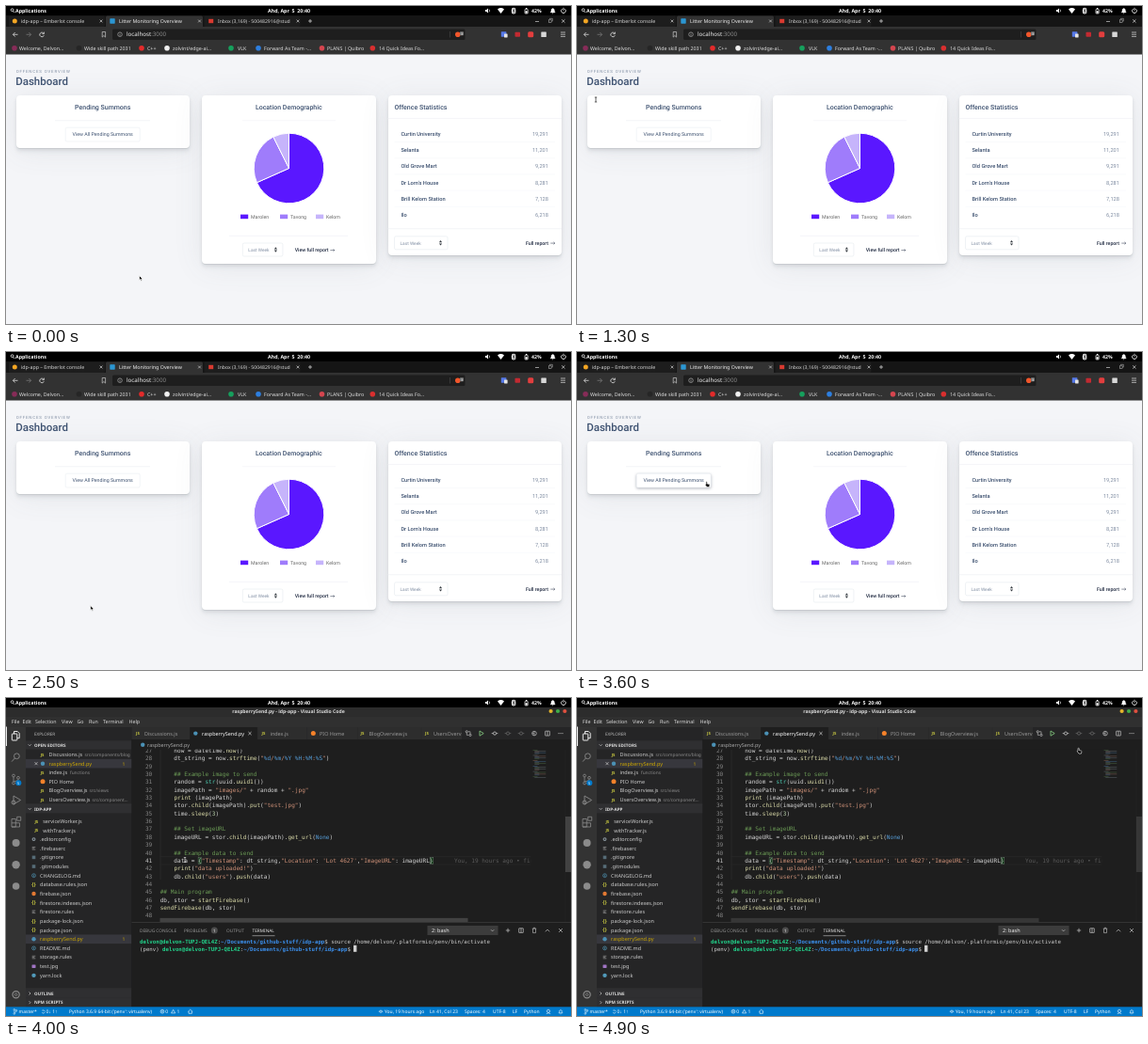
Write an HTML page that moves like this. It is 600 by 338 pixels and loops after 5000 ms.

```html
<!DOCTYPE html>
<html lang="en">
<head>
<meta charset="utf-8">
<title>Desktop demo</title>
<style>
html, body { margin: 0; width: 100%; height: 100%; overflow: hidden; background: #000; }
.scene, svg { position: absolute; left: 0; top: 0; width: 600px; height: 338px; overflow: hidden; }
text { white-space: pre; text-rendering: geometricPrecision; }
.card {
  position: absolute; top: 95px; width: 184.5px; border-radius: 4px; background: #fff;
  box-shadow: 0 .9px 0 rgba(90,97,105,.11), 0 1.8px 3.5px rgba(90,97,105,.12),
    0 4.4px 4.4px rgba(90,97,105,.06), 0 3px 31px rgba(90,97,105,.1);
}
.hover { filter: drop-shadow(0 1px 1.5px rgba(60,70,90,.4)); }
</style>
</head>
<body>
<div class="scene" id="web" style="background:#f4f5f8">
  <div class="card" style="left:10.5px;height:56px"></div>
  <div class="card" style="left:208px;height:178.5px"></div>
  <div class="card" style="left:405.5px;height:170px"></div>
</div>
<div class="scene" id="ide" style="background:#1e1e1e"></div>
<svg id="top" viewBox="0 0 600 338"></svg>
<script>
const NS = 'http://www.w3.org/2000/svg';
const UI = "'Noto Sans', 'Open Sans', sans-serif", WEB = 'Roboto, sans-serif';
const MONO = "'DejaVu Sans Mono', 'Noto Sans Mono', monospace";
let layer, font = UI;

function add(tag, attrs, parent = layer) {
  const e = document.createElementNS(NS, tag);
  for (const k in attrs) e.setAttribute(k, attrs[k]);
  parent.appendChild(e);
  return e;
}
const svgIn = id => add('svg', { viewBox: '0 0 600 338' }, document.getElementById(id));
function text(x, y, str, size, fill, more = {}) {
  const e = add('text', { x, y, fill, 'font-size': size, 'font-family': font, ...more });
  e.textContent = str;
  return e;
}
function mono(x, y, size, parts) {
  const e = add('text', { x, y, 'font-size': size, 'font-family': MONO });
  for (const [str, fill, weight = 400] of parts)
    add('tspan', { fill, 'font-weight': weight }, e).textContent = str;
}
const rect = (x, y, width, height, fill, rx = 0, more = {}) => add('rect', { x, y, width, height, fill, rx, ...more });
const dot = (cx, cy, r, fill) => add('circle', { cx, cy, r, fill });
const ring = (cx, cy, r, stroke, w = .7) => add('circle', { cx, cy, r, stroke, fill: 'none', 'stroke-width': w });
const line = (d, stroke, w = .7) => add('path', { d, stroke, fill: 'none', 'stroke-width': w });
const fill = (d, color) => add('path', { d, fill: color });
const cross = (x, y, r, c, w = .7) => line(`M${x - r} ${y - r}l${2 * r} ${2 * r}m0 ${-2 * r}l${-2 * r} ${2 * r}`, c, w);
const plus = (x, y, r, c) => line(`M${x - r} ${y}h${2 * r}M${x} ${y - r}v${2 * r}`, c);
const frame = (x, y, w, h, c, rx = 0, bg = 'none', sw = .5) => rect(x, y, w, h, bg, rx, { stroke: c, 'stroke-width': sw });

function panelBar() {
  font = UI;
  rect(0, 0, 600, 10, '#000');
  ring(6.6, 4.2, 1.4, '#fff', .8);
  line('M7.6 5.3l1.5 1.8', '#fff', .8);
  text(10, 7.2, 'Applications', 5.3, '#fff', { 'font-weight': 700 });
  text(300.5, 7.2, 'Ahd, Apr  5  20:40', 5.3, '#fff', { 'font-weight': 700, 'text-anchor': 'middle' });
  fill('M509 4h1.3l1.7-1.6v5.2l-1.7-1.6h-1.3z', '#fff');
  line('M513.2 3.6q1 1.4 0 2.8', '#fff', .6);
  fill('M522 3.4q3.5-2.8 7 0l-3.5 4.6z', '#fff');
  rect(536.9, 1.7, 4.4, 6.8, '#fff', 2.1);
  line('M537.8 3.6l2.6 2.8l-1.3 1.2v-5l1.3 1.2l-2.6 2.8', '#000', .5);
  frame(551, 3.4, 3.2, 4.6, '#fff', .5, 'none', .7);
  rect(551.6, 5.2, 2, 2.5, '#fff');
  rect(551.9, 2, 1.4, 1, '#fff');
  text(558, 7.2, '42%', 5.2, '#fff', { 'font-weight': 700 });
  fill('M577.8 7l1-1.3v-1.8q1.9-3.2 3.8 0v1.8l1 1.3zM579.8 7.5h1.8l-.9.9z', '#fff');
  line('M590.6 3.2a2.4 2.4 0 1 0 2.8 0M592 1.8v3', '#fff', .8);
}

function buildBrowser() {
  layer = svgIn('web');
  rect(0, 10, 600, 12.5, '#151515');
  rect(0, 22, 600, 29.5, '#323232');
  rect(3, 10.5, 102, 11.5, '#1d1d1d', 1.5);
  rect(106, 10.5, 103, 12.5, '#323232', 1.5);
  rect(210.5, 10.5, 102, 11.5, '#1d1d1d', 1.5);
  panelBar();

  dot(9.3, 16, 2.5, '#f5a623');
  rect(110.3, 13.3, 5.4, 5.4, '#2b97d3', .6);
  rect(215.2, 13.8, 5, 4.4, '#d93a30');
  text(16, 18, 'idp-app – Emberlot console', 5.25, '#d8d8d8');
  text(120, 18, 'Litter Monitoring Overview', 5.3, '#eee');
  text(225, 18, 'Inbox (3,169) - 500482916@stud', 5.1, '#d8d8d8');
  rect(304, 12, 3, 9, '#1d1d1d');
  for (const x of [101, 205.5, 310]) cross(x, 16, 1.4, '#ccc');
  plus(323, 16, 2, '#ddd');
  line('M562 16.5h4', '#ccc');
  frame(576.3, 14.8, 2.8, 2.8, '#ccc');
  line('M577.5 14v-.7h2.8v2.8h-.8', '#ccc', .5);
  cross(591.8, 16, 1.7, '#ddd');

  line('M12.5 30.3h-5m2.2-2.3l-2.3 2.3l2.3 2.3', '#ddd', .8);
  line('M21.5 30.3h5m-2.2-2.3l2.3 2.3l-2.3 2.3', '#777', .8);
  line('M39.8 28.9a2.3 2.3 0 1 0 .5 2.2M40.4 27.6v2h-2', '#ddd', .8);
  line('M102.2 27.5h3.4v5.6l-1.7-1.6l-1.7 1.6z', '#ccc', .7);
  rect(113, 24.5, 374.5, 11.5, '#1e1e1e', 1.5);
  ring(121, 30.2, 2.3, '#bbb', .6);
  line('M121 29.8v1.8m0-2.9v.5', '#bbb', .6);
  const url = text(128, 32.4, 'localhost', 6.2, '#f2f2f2');
  add('tspan', { fill: '#8d8d8d' }, url).textContent = ':3000';
  line('M471.5 27v6.5', '#555', .5);
  dot(479.8, 30.3, 2.8, '#f1562b');
  rect(482, 27.2, 4, 4, '#777', .8);
  text(483, 30.5, '3', 3.5, '#fff');
  rect(525.8, 27.2, 5.6, 5.6, '#5578e8', .6);
  rect(529, 29.5, 3.6, 4, '#e4e4e4', .4);
  rect(540.5, 27.8, 5.5, 5, '#c22a31', .8);
  rect(554.2, 27.2, 6, 6, '#e23e3e', 1.5);
  rect(568.3, 27.5, 5.5, 5.5, '#d8d8d8', .5);
  line('M589 28h5m-5 2.2h5m-5 2.2h5', '#ddd');

  const marks = [[9, '#872c58', 14, 'Welcome, Delvon...'], [77.5, '#262626', 83, 'Wide skill path 2031'],
    [144, '#e32b2b', 150, 'C++'], [171, '#f0f0f0', 177, 'zolvint/edge-ai...'],
    [239, '#16a05d', 246, 'VLK'], [268, '#2d7fe0', 274, 'Forward As Team -...'],
    [335.5, '#d5454f', 341, 'PLANS | Quibro'], [389.3, '#d92f2f', 396, '14 Quick Ideas Fo...']];
  for (const [x, c, tx, name] of marks) {
    dot(x, 44.8, 2.8, c);
    text(tx, 46.8, name, 5.3, '#e0e0e0');
  }

  font = WEB;
  const ink = '#3d5170', soft = '#818ea3', rule = '#eceff3';
  const bold = { 'font-weight': 500 }, mid = { ...bold, 'text-anchor': 'middle' };
  text(10.7, 71.1, 'OFFENCES OVERVIEW', 4.3, soft, { 'letter-spacing': .88 });
  text(10.2, 84, 'Dashboard', 11.5, ink, bold);

  text(102.7, 110.4, 'Pending Summons', 7, ink, mid);
  line('M52 121.7h101', rule, .6);
  const button = frame(63.2, 129.2, 79, 14.8, '#e4e8ee', 1.6, '#fff');
  text(102.7, 138.4, 'View All Pending Summons', 5.27, ink, { 'text-anchor': 'middle' });

  text(300.3, 110.4, 'Location Demographic', 7, ink, mid);
  line('M251 121.7h99', '#f1f3f6', .6);
  const at = a => `${300.5 + 37.3 * Math.sin(a * Math.PI / 180)} ${172.5 - 37.3 * Math.cos(a * Math.PI / 180)}`;
  const shades = ['#5a17ff', '#9f7cfb', '#c6b4fb'], cuts = [0, 246, 333.5, 360];
  const areas = [[249, 'Marolen'], [291, 'Tavong'], [329, 'Kelom']];
  shades.forEach((c, i) => {
    const wide = cuts[i + 1] - cuts[i] > 180 ? 1 : 0;
    add('path', { d: `M300.5 172.5L${at(cuts[i])}A37.3 37.3 0 ${wide} 1 ${at(cuts[i + 1])}z`,
      fill: c, stroke: '#fff', 'stroke-width': 1 });
    rect(areas[i][0], 221.6, 8.2, 4.6, c);
    text(areas[i][0] + 11, 225.9, areas[i][1], 5.27, '#666');
  });
  line('M237 244.3h126', rule, .6);

  const select = (x, y, w) => {
    frame(x, y, w, 14, '#dfe4ea', 1.6, '#fff');
    text(x + 6, y + 8.7, 'Last Week', 4.8, soft);
    const a = x + w - 7.5;
    fill(`M${a - 1.6} ${y + 6.4}l1.6-2.2l1.6 2.2zM${a - 1.6} ${y + 7.6}l1.6 2.2l1.6-2.2z`, '#343a40');
  };
  const report = (x, y, s, ax) => {
    text(x, y, s, 5.27, '#212b42', bold);
    line(`M${ax} ${y - 1.7}h4.6m-1.4-1.2l1.3 1.2l-1.3 1.2`, '#212b42', .5);
  };
  select(251.3, 252, 42.6);
  report(306.7, 261.3, 'View full report', 344.3);

  text(412.4, 110.2, 'Offence Statistics', 7, ink, bold);
  line('M405.5 119.6h184.5M405.5 236.7h184.5', rule, .6);
  const rows = [['Curtin University', '19,291'], ['Selanta', '11,201'], ['Old Grove Mart', '9,291'],
    ["Dr Lorn's House", '8,281'], ['Brill Kelom Station', '7,128'], ['Ilo', '6,218']];
  rows.forEach(([name, n], i) => {
    const y = 138 + i * 17.2;
    text(419.4, y, name, 5.7, ink, bold);
    text(576, y, n, 5.7, soft, { 'text-anchor': 'end' });
    if (i < 5) line(`M412.5 ${y + 6.5}h170.5`, '#f3f5f8', .5);
  });
  select(412.5, 244.8, 56.5);
  report(552, 253.8, 'Full report', 578.3);
  return button;
}

function fileIcon(kind, x, y) {
  if (kind === 'js') text(x - 2.3, y + 1.7, 'JS', 4.3, '#cbcb41', { 'font-weight': 700 });
  else if (kind === 'json') text(x - 2.2, y + 1.7, '{}', 5.4, '#cbcb41', { 'font-weight': 700 });
  else if (kind === 'py') dot(x, y, 2.2, '#4b91b5');
  else if (kind === 'pio') dot(x, y, 2.5, '#f5822a');
  else if (kind === 'fire') dot(x, y, 2.2, '#e37933');
  else if (kind === 'git') rect(x - 1.8, y - 1.8, 3.6, 3.6, '#566c77');
  else if (kind === 'md') { ring(x, y, 1.9, '#519aba'); line(`M${x} ${y - .9}v2`, '#519aba', .6); }
  else if (kind === 'gear') ring(x, y, 1.4, '#8d9aa3', 1.1);
  else if (kind === 'img') rect(x - 2, y - 1.7, 4, 3.4, '#a074c4', .4);
  else if (kind === 'lock') dot(x, y, 2.2, '#519aba');
  else line(`M${x - 1.8} ${y - 1.3}h3.6m-3.6 1.3h2.6m-2.6 1.3h3.6`, '#c5c5c5', .5);
}

function buildSidebar() {
  const grey = '#ccc', warn = '#cca700', head = { 'font-weight': 700 };
  rect(0, 31, 21, 298, '#333');
  rect(21, 31, 112.5, 298, '#252526');
  const dim = '#8b8b8b';
  rect(0, 30.5, .9, 20.5, '#fff');
  frame(6.3, 38, 5.5, 7, '#fff', .6, 'none', .9);
  line('M8.5 38v-2.5h3.7l2 2v5.2h-2.2', '#fff', .9);
  ring(11.4, 61.8, 2.9, dim, .9);
  line('M9.3 64l-3.2 3.6', dim, .9);
  for (const [x, y] of [[8, 82.5], [8, 90.5], [13, 84.8]]) ring(x, y, 1.4, dim, .8);
  line('M8 84v5M13 86.3q0 2.2-4.4 2.4', dim, .8);
  dot(13.3, 90.2, 3, '#007acc');
  text(12.1, 91.6, '5', 3.8, '#fff');
  line('M8 104l7.5 4.5l-7.5 4.5z', dim, .9);
  ring(8, 111, 2, dim, .9);
  line('M6 128.5h4.3v8.5h-4.3zM6 132.8h8.5v4.2h-8.5M11.7 126.3h4v4h-4z', dim, .8);
  dot(10.6, 154, 4, dim);
  dot(10.6, 177.3, 4.2, dim);
  dot(10.6, 200, 3.8, dim);
  ring(10.6, 315.2, 3.6, dim, 1.2);
  ring(10.6, 315.2, 1.3, dim, .8);

  text(30, 39.7, 'EXPLORER', 4.6, '#bbb');
  const section = (y, s, open) => {
    rect(21, y - 4.6, 112.5, 9.2, '#2f2f31');
    line(open ? `M23.7 ${y - .7}l1.5 1.5l1.5-1.5` : `M24.5 ${y - 1.5}l1.5 1.5l-1.5 1.5`, grey);
    text(30, y + 1.7, s, 4.6, '#ddd', head);
  };
  section(50, 'OPEN EDITORS', true);
  section(117.8, 'IDP-APP', true);
  line('M21 113h112.5M21 309h112.5M21 319h112.5', '#414143', .5);
  section(314, 'OUTLINE', false);
  section(323.7, 'NPM SCRIPTS', false);

  const row = (y, kind, x, s, hint = '', hx = 0) => {
    const on = kind === 'py';
    if (on) {
      rect(21, y - 4.8, 112.5, 9.6, '#37373d');
      text(123.5, y + 1.8, '1', 5, warn);
    }
    fileIcon(kind, x - 6.5, y);
    text(x, y + 1.9, s, 5.5, on ? warn : grey);
    if (hint) text(hx, y + 1.8, hint, 4.8, '#8c8c8c');
  };
  row(60, 'js', 45.5, 'Discussions.js', 'src/components/blog', 83.5);
  row(69.7, 'py', 45.5, 'raspberrySend.py');
  cross(32, 69.7, 1.5, grey);
  row(79.2, 'js', 45.5, 'index.js', 'functions', 68);
  row(88.8, 'pio', 45.5, 'PIO Home');
  row(98.5, 'js', 45.5, 'BlogOverview.js', 'src/views', 88.5);
  row(108, 'js', 45.5, 'UsersOverview.js', 'src/component...', 91.5);
  row(131, 'js', 39.2, 'serviceWorker.js');
  row(140.6, 'js', 39.2, 'withTracker.js');
  const files = [['gear', '.editorconfig'], ['', '.firebaserc'], ['git', '.gitignore'], ['git', '.gitmodules'],
    ['md', 'CHANGELOG.md'], ['json', 'database.rules.json'], ['fire', 'firebase.json'], ['json', 'firestore.indexes.json'],
    ['', 'firestore.rules'], ['json', 'package-lock.json'], ['json', 'package.json'], ['py', 'raspberrySend.py'],
    ['md', 'README.md'], ['', 'storage.rules'], ['img', 'test.jpg'], ['lock', 'yarn.lock']];
  files.forEach(([kind, s], i) => row(150.1 + i * 9.65, kind, 36, s));
}

function buildCode() {
  const W = '#d4d4d4', F = '#dcdcaa', S = '#ce9178', G = '#6a9955', B = '#569cd6', N = '#b5cea8', C = '#4ec9b0';
  const code = {
    27: [['    now = datetime.', W], ['now', F], ['()', W]],
    28: [['    dt_string = now.', W], ['strftime', F], ['(', W], ['"', S], ['%d', B], ['/', S], ['%m', B], ['/', S],
      ['%Y %H', B], [':', S], ['%M', B], [':', S], ['%S', B], ['"', S], [')', W]],
    30: [['    ## Example image to send', G]],
    31: [['    random = ', W], ['str', C], ['(uuid.', W], ['uuid1', F], ['())', W]],
    32: [['    imagePath = ', W], ['"images/"', S], [' + random + ', W], ['".jpg"', S]],
    33: [['    ', W], ['print', F], [' (imagePath)', W]],
    34: [['    stor.', W], ['child', F], ['(imagePath).', W], ['put', F], ['(', W], ['"test.jpg"', S], [')', W]],
    35: [['    time.', W], ['sleep', F], ['(', W], ['3', N], [')', W]],
    37: [['    ## Set imageURL', G]],
    38: [['    imageURL = stor.', W], ['child', F], ['(imagePath).', W], ['get_url', F], ['(', W], ['None', B], [')', W]],
    40: [['    ## Example data to send', G]],
    41: [['    data = {', W], ['"Timestamp"', S], [': dt_string,', W], ['"Location"', S], [': ', W], ["'Lot 4627'", S],
      [',', W], ['"ImageURL"', S], [': imageURL}', W]],
    42: [['    ', W], ['print', F], ['(', W], ['"data uploaded!"', S], [')', W]],
    43: [['    db.', W], ['child', F], ['(', W], ['"users"', S], [').', W], ['push', F], ['(data)', W]],
    45: [['## Main program', G]],
    46: [['db, stor = ', W], ['startFirebase', F], ['()', W]],
    47: [['sendFirebase', F], ['(db, stor)', W]]
  };
  const size = 6.1, col = size * .602;
  rect(133.5, 44, 467, 285, '#1e1e1e');
  line('M164 55v138', '#393939', .4);
  line('M163.5 168.6h394M163.5 177h394', '#2a2a2a', .5);
  for (const n of [11, 78]) frame(163.7 + n * col, 169.2, col, 7.4, '#888', 0, '#0a3410', .4);
  for (let n = 27; n < 49; n++) {
    const y = 83.1 + (n - 30) * 8.34;
    add('text', { x: 155.3, y, fill: n === 41 ? '#c6c6c6' : '#858585', 'font-size': size,
      'font-family': MONO, 'text-anchor': 'end' }).textContent = n;
    if (code[n]) mono(163.7, y, size, code[n]);
  }
  mono(476, 174.9, size, [['You, 19 hours ago • first upload', '#5a5a5a']]);

  // minimap
  rect(557.5, 44, 42.5, 194, '#1e1e1e');
  const tints = [G, S, '#8c9aa5', '#8c9aa5', B];
  for (let i = 0; i < 32; i++) {
    if (i % 6 === 5) continue;
    rect(559.5 + (i % 6 ? 1.8 : 0), 55 + i * .95, 5 + (i * 7) % 14, .55, tints[(i * 3) % 5], 0, { opacity: .5 });
  }
  line('M594 55v183', '#2c2c2c', .4);

  const bars = add('g', {});
  const bar = { opacity: .4 };
  bars.append(rect(594, 126, 6, 59, '#797979', 0, bar), rect(163.5, 233.9, 327, 4.2, '#797979', 0, bar));
  return bars;
}

function buildTabs() {
  const grey = '#9a9a9a';
  rect(133.5, 44, 424, 10.6, '#1e1e1e');
  fileIcon('py', 145.2, 49.8);
  text(150, 51.7, 'raspberrySend.py', 5.45, '#a9a9a9');
  rect(133.5, 31, 467, 13, '#252526');
  const tabs = [[133.5, 61.5, 'js', 147, 'Discussions.js'], [195.3, 71.5, 'py', 208, 'raspberrySend.py'],
    [267.1, 52.5, 'js', 280.5, 'index.js'], [320, 53, 'pio', 333, 'PIO Home'],
    [373.3, 67.5, 'js', 385.5, 'BlogOverview.js'], [441.1, 43, 'js', 454, 'UsersOverview.js']];
  for (const [x, w, kind, tx, s] of tabs) {
    const on = kind === 'py';
    rect(x, 31, w, 13, on ? '#1e1e1e' : '#2d2d2d');
    fileIcon(kind, tx - 6.7, 37.6);
    text(tx, 39.6, s, 5.45, on ? '#fff' : grey);
  }
  cross(259, 37.6, 1.6, '#ddd');
  rect(484, 31, 116, 13, '#252526');
  const c = '#c5c5c5';
  ring(489.3, 35.8, 1.1, c); ring(493, 39.4, 1.1, c);
  line('M489.3 37v2.4h2M493 38.2v-2.4h-2', c, .6);
  line('M503 35l4.2 2.6l-4.2 2.6z', '#89d185', .8);
  const commit = (x, col) => { ring(x, 37.6, 1.6, col, .8); line(`M${x - 3.3} 37.6h1.7m3.2 0h1.7`, col, .8); };
  commit(519, c); commit(533, '#666'); commit(547, '#666');
  ring(561, 37.6, 2.3, c); line('M561 35.3v4.6M558.8 37.6h2.2', c, .6);
  frame(572.6, 35.2, 4.8, 4.8, c, .3, 'none', .7); line('M575 35.2v4.8', c);
  for (const x of [587, 589, 591]) dot(x, 37.6, .55, c);
}

function buildTerminal() {
  const c = '#c5c5c5', user = 'delvon@delvon-TUPJ-QEL4Z', path = '~/Documents/github-stuff/idp-app';
  rect(133.5, 238.3, 467, 91, '#1e1e1e');
  line('M133.5 238.5h467', '#4a4a4a', .5);
  for (const [x, s, on] of [[142, 'DEBUG CONSOLE'], [189, 'PROBLEMS'], [234, 'OUTPUT'], [261.5, 'TERMINAL', 1]])
    text(x, 248.8, s, 4.75, on ? '#e7e7e7' : '#969696');
  dot(221.3, 247.1, 3.5, '#4d4d4d');
  text(220, 248.8, '1', 4.4, '#fff');
  line('M261.5 252.7h24', '#e7e7e7', .5);
  rect(447.5, 242, 75, 10, '#3c3c3c');
  text(452, 249, '2: bash', 5.5, '#f0f0f0');
  line('M515 246.3l1.6 1.6l1.6-1.6', c);
  plus(533, 247, 2.2, c);
  frame(544.7, 244.8, 4.6, 4.6, c, .2, 'none', .7); line('M547 244.8v4.6', c);
  line('M558.8 245.2h4.4m-3.7 0v4.4h3v-4.4m-2.2 0v-1h1.4v1', c, .6);
  line('M572.8 248.3l2.2-2.2l2.2 2.2', c);
  cross(589, 247, 1.9, c);

  const prompt = [[user, '#23d18b', 700], [':', '#ccc'], [path, '#3b8eea', 700], ['$ ', '#ccc']];
  mono(142, 261, 5.72, [...prompt, ['source /home/delvon/.platformio/penv/bin/activate', '#ccc']]);
  mono(142, 268.5, 5.72, [['(penv) ', '#ccc'], ...prompt]);
  rect(369, 262.8, 3.4, 7, '#d0d0d0');
}

function buildStatus() {
  rect(0, 328.3, 600, 9.7, '#007acc');
  const w = '#fff', put = (x, s) => text(x, 335, s, 5, w);
  ring(8.8, 331.3, .8, w, .5); ring(8.8, 335.5, .8, w, .5); ring(11, 332.2, .8, w, .5);
  line('M8.8 332v2.8M11 333q0 1-2 1.4', w, .5);
  put(13.5, 'master*');
  line('M38.3 332.2a1.9 1.9 0 0 1 2.9 1M38.2 334.4a1.9 1.9 0 0 0 2.9-.2', w, .6);
  put(42.5, '0↓ 1↑');
  put(67, "Python 3.6.9 64-bit ('penv': virtualenv)");
  ring(166, 333.2, 1.9, w, .6); cross(166, 333.2, .8, w, .5);
  put(169.2, '0');
  line('M177.6 331.3l2.1 3.6h-4.2z', w, .6);
  put(181.5, '1');
  line('M193.3 333.3l2.4-2.1l2.4 2.1M194 333v2.3h3.4v-2.3', w, .6);
  ring(398, 333.2, 1.2, w, .6); line('M395.8 333.2h1m2.4 0h1', w, .6);
  for (const [x, s] of [[402, 'You, 19 hours ago'], [450, 'Ln 41, Col 23'], [487, 'Spaces: 4'],
    [517, 'UTF-8'], [538, 'LF'], [550, 'Python']]) put(x, s);
  ring(576, 332.8, 1.6, w, .6);
  line('M573.8 335.6q2.2-1.8 4.4 0', w, .6);
  line('M587 334.8h4l-.7-1v-1.4q-1.3-1.8-2.6 0v1.4zM588.6 335.8h.8', w, .6);
}

function buildEditor() {
  layer = svgIn('ide');
  panelBar();
  rect(0, 10, 600, 9.3, '#2c2c2c');
  text(300, 16.1, 'raspberrySend.py - idp-app - Visual Studio Code', 5.1, '#ddd', { 'font-weight': 600, 'text-anchor': 'middle' });
  ['#e5b52b', '#3fae49', '#e0503f'].forEach((c, i) => dot(578.6 + i * 7.4, 14, 2.1, c));
  rect(0, 19.3, 600, 11.7, '#303030');
  for (const [x, s] of [[6, 'File'], [17.5, 'Edit'], [31, 'Selection'], [59, 'View'], [75.5, 'Go'],
    [88, 'Run'], [103, 'Terminal'], [130.5, 'Help']]) text(x, 26.5, s, 5.3, '#ddd');
  buildSidebar();
  const bars = buildCode();
  buildTabs();
  buildTerminal();
  buildStatus();
  return bars;
}

function pointer(d, color, edge) {
  const g = add('g', {});
  add('path', { d, fill: color, stroke: edge, 'stroke-width': .7, 'stroke-linejoin': 'round' }, g);
  return g;
}

const button = buildBrowser();
const scrollbars = buildEditor();
layer = document.getElementById('top');
const cursors = {
  arrow: pointer('M0 0v5l1.2-1l.8 1.8l.9-.4l-.8-1.7h1.6z', '#000', '#fff'),
  hand: pointer('M0 0q.8-.8 1.2.2v1.8l2.2.6q.7.3.5 1.2l-.5 1.8h-2.4l-1.8-2.3q0-.8.8-.5z', '#000', '#ddd'),
  beam: pointer('M-1.2-2.5h2.4M0-2.5v5M-1.2 2.5h2.4', 'none', '#222')
};

// time, x, y
const path = [[0, 141.5, 286.5], [600, 141.5, 286.5], [900, 92, 215], [1200, 26, 108], [1300, 20, 99.5],
  [1600, 21, 110], [2000, 40, 160], [2400, 77, 241], [2500, 89.7, 269.5], [2700, 97, 258], [3000, 115, 216],
  [3300, 134, 148], [3400, 137, 138], [3700, 137, 138], [4000, 190, 172], [4400, 304.5, 242.5],
  [4600, 385, 186], [4900, 532, 53.5]];

function locate(t) {
  let i = 0;
  while (i < path.length - 2 && path[i + 1][0] <= t) i++;
  const [t0, x0, y0] = path[i], [t1, x1, y1] = path[i + 1];
  const k = Math.min(1, (t - t0) / (t1 - t0));
  return [x0 + (x1 - x0) * k, y0 + (y1 - y0) * k];
}

const ide = document.getElementById('ide');
function draw(now) {
  const t = Math.floor(now % 5000 / 100) * 100;
  const [x, y] = locate(t), coding = t >= 3700;
  const over = !coding && x > 63 && x < 142 && y > 129 && y < 144;
  ide.style.display = coding ? '' : 'none';
  button.setAttribute('class', over ? 'hover' : '');
  scrollbars.setAttribute('opacity', t <= 3700 ? 0 : y < 55 ? .7 : 1);
  let kind = 'arrow';
  if (over || t === 3700 || t === 4900) kind = 'hand';
  else if (coding ? y > 55 && y < 238 : t > 1200 && t < 1500) kind = 'beam';
  for (const k in cursors) cursors[k].style.display = k === kind ? '' : 'none';
  cursors[kind].setAttribute('transform', `translate(${x} ${y})`);
  cursors.beam.firstChild.setAttribute('stroke', coding ? '#ddd' : '#222');
  requestAnimationFrame(draw);
}
requestAnimationFrame(draw);
</script>
</body>
</html>
```
